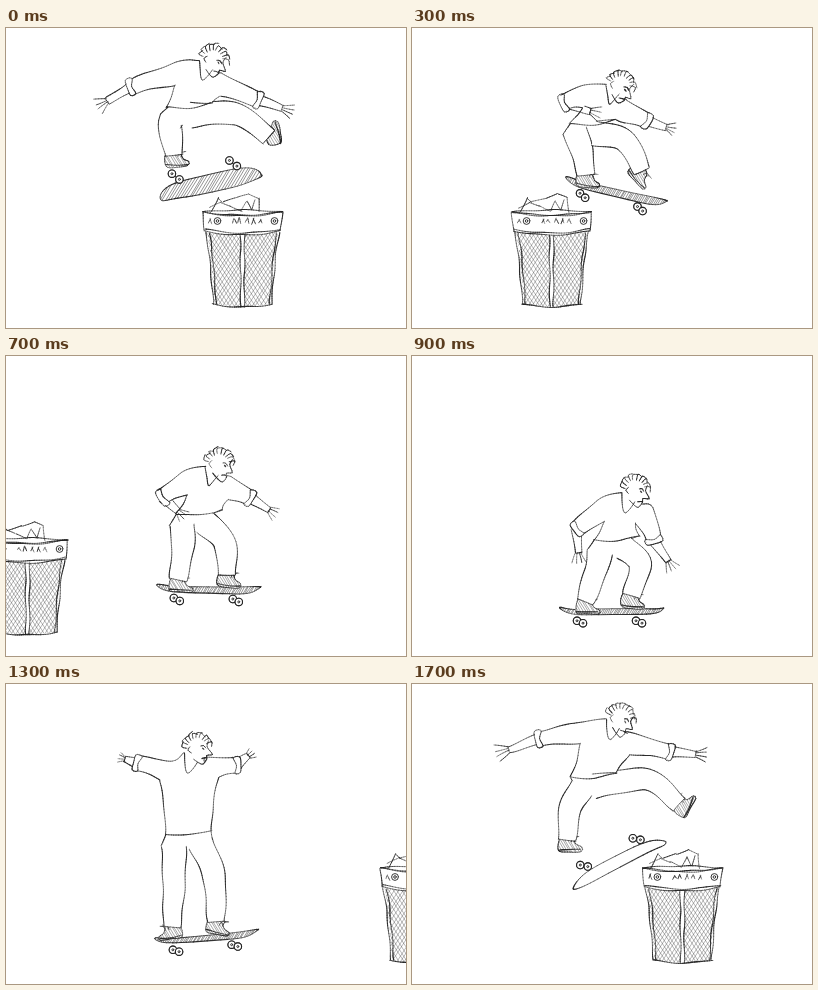
These frames come from a looping animation (400x300 px, 1800 ms). An HTML page with a canvas:

```html
<!DOCTYPE html>
<html lang="en">
<head>
<meta charset="utf-8">
<title>Skateboard jump</title>
<style>
html, body { margin: 0; width: 100%; height: 100%; overflow: hidden; background: #fff; }
canvas { display: block; }
</style>
</head>
<body>
<canvas id="stage" width="400" height="300"></canvas>
<script>
const ctx = document.getElementById('stage').getContext('2d');
const STEP = 100, STEPS = 18;

// Arms: elbow, hand. Legs: hip, knee, ankle. Feet: toe angles, left and right.
// Head: x, y, tilt. Board: x, y, tilt, half width, wheel side, shading.
const poses = [
  { at: 0, head: [207, 32, 20], armL: [125,59, 91,79], armR: [252,72, 287,84],
    legL: [168,90, 164,96, 168,127], legR: [185,87, 230,86, 263,109], feet: [0, -100],
    board: [204, 155, -13, 9, -14, 1] },
  { at: 3, head: [208, 58, 26], armL: [152,75, 189,87], armR: [235,93, 263,102],
    legL: [163,103, 170,124, 174,147], legR: [182,105, 213,113, 230,143], feet: [10, 50],
    board: [204, 165, 13, 4, 10, 1] },
  { at: 5, head: [203, 82, 14], armL: [148,110, 191,115], armR: [246,100, 280,104],
    legL: [164,142, 170,166, 171,202], legR: [187,142, 209,165, 223,198], feet: [5, 5],
    board: [206, 212, 2, 4, 10, 1] },
  { at: 9, ease: 2, head: [223, 134, 10], armL: [165,173, 167,207], armR: [242,184, 262,214],
    legL: [188,196, 184,214, 173,246], legR: [212,192, 228,208, 219,240], feet: [5, 10],
    board: [200, 256, 0, 3, 10, 1] },
  { at: 13, head: [191, 64, 0], armL: [131,79, 113,73], armR: [231,81, 247,68],
    legL: [168,162, 168,198, 166,243], legR: [195,160, 208,192, 210,238], feet: [170, 15],
    board: [201, 254, -5, 3, 10, 1] },
  { at: 15, head: [213, 47, 12], armL: [144,51, 110,39], armR: [262,51, 285,34],
    legL: [182,120, 178,160, 161,216], legR: [192,122, 240,121, 244,164], feet: [140, 150],
    board: [201, 216, -44, 10, 7, 0] },
  { at: 17, head: [208, 35, 20], armL: [127,55, 84,70], armR: [258,68, 295,71],
    legL: [170,104, 159,122, 155,156], legR: [182,102, 236,96, 267,121], feet: [0, -60],
    board: [206, 178, -27, 6, -12, 0] }
];

let seed = 1;
function random() {
  seed = (seed * 16807) % 2147483647;
  return seed / 2147483647;
}
const jitter = size => (random() - 0.5) * size;
const radians = degrees => degrees * Math.PI / 180;
const mix = (a, b, u) => a + (b - a) * u;
const between = (p, q, u) => [mix(p[0], q[0], u), mix(p[1], q[1], u)];
const pairs = flat => flat.flatMap((v, i) => i % 2 ? [] : [[v, flat[i + 1]]]);

function turn([x, y], angle) {
  const c = Math.cos(angle), s = Math.sin(angle);
  return [x * c - y * s, x * s + y * c];
}

function direction(p, q) {
  const length = Math.hypot(q[0] - p[0], q[1] - p[1]) || 1;
  return [(q[0] - p[0]) / length, (q[1] - p[1]) / length];
}

function poseAt(step) {
  const i = poses.findLastIndex(pose => pose.at <= step);
  const from = poses[i], to = poses[(i + 1) % poses.length];
  const u = ((step - from.at) / ((to.at || STEPS) - from.at)) ** (from.ease || 1);
  const pose = {};
  for (const part in to) {
    if (Array.isArray(to[part])) pose[part] = from[part].map((v, k) => mix(v, to[part][k], u));
  }
  return pose;
}

// Dense points of a smooth curve through a few points
function spline(points, closed = false) {
  const n = points.length, dense = [];
  const at = i => points[closed ? (i + n) % n : Math.min(n - 1, Math.max(0, i))];
  for (let i = 0; i < (closed ? n : n - 1); i++) {
    const [a, b, c, d] = [at(i - 1), at(i), at(i + 1), at(i + 2)];
    const parts = Math.max(2, Math.ceil(Math.hypot(c[0] - b[0], c[1] - b[1]) / 2.5));
    for (let k = 0; k < parts; k++) {
      const t = k / parts;
      dense.push([0, 1].map(e => b[e] + t / 2 * (c[e] - a[e]
        + t * (2 * a[e] - 5 * b[e] + 4 * c[e] - d[e] + t * (3 * (b[e] - c[e]) + d[e] - a[e])))));
    }
  }
  dense.push(at(closed ? 0 : n - 1));
  return dense;
}

function trace(points) {
  ctx.beginPath();
  points.forEach(p => ctx.lineTo(p[0], p[1]));
}

function blank(points) {
  ctx.fillStyle = '#fff';
  trace(points);
  ctx.fill();
}

// A line with slow wobble and changing pressure
function stroke(dense, weight = 1) {
  const phase = random() * 6;
  const line = dense.map(([x, y], i) =>
    [x + 0.5 * Math.sin(i * 0.45 + phase), y + 0.5 * Math.cos(i * 0.37 + phase)]);
  for (let i = 1; i < line.length; i++) {
    const pressure = 0.75 + 0.25 * Math.sin(i * 0.3 + phase);
    ctx.globalAlpha = 0.45 + 0.5 * pressure;
    ctx.lineWidth = weight * (0.45 + 0.6 * pressure);
    trace([line[i - 1], line[i]]);
    ctx.stroke();
  }
  ctx.globalAlpha = 1;
}

const pencil = (points, weight, closed) => stroke(spline(points, closed), weight);

function jagged(points, weight) {
  points.slice(1).forEach((p, i) => pencil([points[i], p], weight));
}

function hatch(outline, slope, gap, alpha) {
  const xs = outline.map(p => p[0]), ys = outline.map(p => p[1]);
  const top = Math.min(...ys), bottom = Math.max(...ys), shift = (bottom - top) * slope;
  const left = Math.min(...xs) - Math.abs(shift), right = Math.max(...xs) + Math.abs(shift);
  ctx.save();
  trace(outline);
  ctx.clip();
  ctx.globalAlpha = alpha;
  ctx.lineWidth = 0.65;
  ctx.beginPath();
  for (let x = left; x < right; x += gap) {
    ctx.moveTo(x + jitter(1.5), top);
    ctx.lineTo(x + shift + jitter(1.5), bottom);
  }
  ctx.stroke();
  ctx.restore();
}

function ring(x, y, r, weight = 0.9) {
  ctx.lineWidth = weight;
  ctx.beginPath();
  ctx.arc(x, y, r, 0, Math.PI * 2);
  ctx.stroke();
}

// Both edges of a tapering limb; side is -1 for left, 1 for right, outer edge first
function tube(joints, widths, side) {
  const dense = spline(joints), last = dense.length - 1;
  return [1, -1].map(edge => dense.map((p, i) => {
    const d = direction(dense[Math.max(0, i - 2)], dense[Math.min(last, i + 2)]);
    const u = i / last * (widths.length - 1), k = Math.min(widths.length - 2, Math.floor(u));
    const w = edge * side * mix(widths[k], widths[k + 1], u - k);
    return [p[0] + d[1] * w, p[1] - d[0] * w];
  }));
}

function drawTube(joints, widths, side) {
  const [outer, inner] = tube(joints, widths, side);
  blank([...outer, ...inner.toReversed()]);
  stroke(outer);
  stroke(inner);
  pencil([outer.at(-1), inner.at(-1)]);
  return [outer, inner];
}

function drawShoe(ankle, angle) {
  const a = radians(angle), flip = Math.cos(a) < -0.3 ? -1 : 1;
  const place = points => points.map(([x, y]) => {
    const [dx, dy] = turn([x, y * flip], a);
    return [ankle[0] + dx, ankle[1] + dy];
  });
  const outline = spline(place(pairs([-7,-2, 5,-2, 9,4, 15,7, 14,11, 3,12, -8,11])), true);
  blank(outline);
  hatch(outline, 0.6, 2.4, 0.6);
  stroke(outline);
  pencil(place([[-8, 10], [3, 10], [14, 9]]), 1.3);
  for (const x of [4, 7]) pencil(place([[x, 2], [x + 1, -2], [x + 5, -3]]), 0.8);
}

function drawArm(shoulder, elbow, hand, neck, side) {
  const d = direction(shoulder, elbow), n = [side * d[1], -side * d[0]];
  const off = (p, along, out) =>
    [p[0] + d[0] * along + n[0] * out, p[1] + d[1] * along + n[1] * out];
  const f = direction(elbow, hand), wrist = between(elbow, hand, 0.7);
  const reach = Math.hypot(hand[0] - wrist[0], hand[1] - wrist[1]);
  drawTube([elbow, wrist], [5.5, 3], side);
  for (const spread of [-0.45, -0.15, 0.15, 0.45]) {
    const start = [wrist[0] - f[1] * spread * 6, wrist[1] + f[0] * spread * 6];
    const tip = turn(f, spread);
    pencil([start, [start[0] + tip[0] * reach, start[1] + tip[1] * reach]], 0.8);
  }
  const armpit = off(shoulder, 8, -11);
  const top = [neck, off(shoulder, 0, 10.5), off(elbow, 0, 7.5)];
  const under = [armpit, off(between(shoulder, elbow, 0.65), 0, -8), off(elbow, 0, -7.5)];
  blank([...spline(top), ...spline(under).toReversed()]);
  pencil(top);
  pencil(under);
  const band = [off(elbow, -3, 8), off(elbow, 3, 8), off(elbow, 4, 0), off(elbow, 3, -8), off(elbow, -3, -8)];
  blank(band);
  pencil([...band, off(elbow, -1, 0)], 1, true);
  return armpit;
}

function drawHead([x, y, tilt]) {
  ctx.save();
  ctx.translate(x, y);
  ctx.rotate(radians(tilt + 6));
  ctx.scale(0.92, 0.92);
  pencil(pairs([12,-9, 11,-3, 14,1, 17,5, 11,7, 12,11, 9,17, 4,16, -3,12]), 1.1);
  pencil([[-8, -1], [-10, 3], [-6, 6]], 0.8);
  pencil([[4, -2], [7, -3], [10, -1]], 1.3);
  pencil([[6, 0], [8, 1]], 1.5);
  pencil([[6, 11], [9, 10], [11, 10]], 1.2);
  // shaggy strands around the skull
  for (let a = 175; a <= 330; a += 17) {
    const root = turn([11, 0], radians(a)), tip = turn([17 + jitter(4), 0], radians(a + 22));
    const bend = turn([17, 0], radians(a + 4));
    pencil([root, bend, tip], 0.95);
  }
  ctx.restore();
}

function drawSkater({ head, armL, armR, legL, legR, feet }) {
  const fromHead = (x, y) => {
    const [dx, dy] = turn([x, y], radians(head[2]));
    return [head[0] + dx, head[1] + dy];
  };
  const neckL = fromHead(-13, 5), neckR = [head[0] + 7, head[1] + 14];
  const left = pairs(legL), right = pairs(legR), trouser = [12.5, 11, 8.5];
  const hips = between(left[0], right[0], 0.5);
  const up = direction(hips, between(neckL, neckR, 0.5));
  const waist = [hips[0] + up[0] * 13, hips[1] + up[1] * 13];
  const waistL = [waist[0] - 23, waist[1] + 2], waistR = [waist[0] + 23, waist[1] - 2];

  drawShoe(left[2], feet[0]);
  drawShoe(right[2], feet[1]);
  const outerL = drawTube(left, trouser, -1)[0], outerR = drawTube(right, trouser, 1)[0];
  blank([neckL, waistL, waistR, neckR]);
  pencil([waistL, outerL[0]]);
  pencil([waistR, outerR[0]]);
  pencil([waistL, [waist[0], waist[1] + 3], waistR]);

  const pitL = drawArm(fromHead(-27, 23), ...pairs(armL), neckL, -1);
  const pitR = drawArm(fromHead(12, 20), ...pairs(armR), neckR, 1);
  for (const [pit, hem] of [[pitL, waistL], [pitR, waistR]]) {
    const middle = between(pit, hem, 0.5);
    pencil([pit, [mix(middle[0], waist[0], 0.06), middle[1]], hem]);
  }
  const tip = [neckL[0] + 4, neckL[1] + 20];
  pencil([neckL, [neckL[0] + 1, neckL[1] + 10], tip, [tip[0] + 9, tip[1] - 11]]);
  drawHead(head);
}

function drawBoard([x, y, tilt, half, wheelSide, shade]) {
  const length = 52, outline = [];
  for (let a = 0; a < 360; a += 6) {
    const c = Math.cos(radians(a)), s = Math.sin(radians(a));
    const along = Math.sign(c) * Math.abs(c) ** 0.6;
    const bend = -Math.sign(wheelSide) * 4 * along ** 6;
    const [dx, dy] = turn([along * length, s * half + bend], radians(tilt));
    outline.push([x + dx, y + dy]);
  }
  outline.push(outline[0]);
  blank(outline);
  if (shade > 0.5) hatch(outline, -0.6, 1.4 + half * 0.15, 0.75);
  stroke(outline, 1.1);
  for (const truck of [-32, 27]) {
    const pair = [-1, 1].map(k => {
      const [dx, dy] = turn([truck + k * 3, wheelSide + k * half * 0.4], radians(tilt));
      return [x + dx, y + dy];
    });
    pencil(pair, 1.4);
    for (const [wx, wy] of pair) {
      ctx.fillStyle = '#fff';
      ring(wx, wy, 3.7, 1.1);
      ctx.fill();
      ring(wx, wy, 3.7, 1.1);
      ring(wx, wy, 1);
    }
  }
}

function drawBin(step) {
  const age = (step + 5) % STEPS; // steps since it came into view
  if (age > 13) return;
  const middle = 41, top = 204, depth = 72;
  const rail = k => [0, 0.2, 0.5, 1].map(u => [
    middle + k * (37 - 8 * Math.sqrt(u) ** 1.4), top + 3 * (1 - k * k) + depth * u]);
  const band = (y, half, sag) => [-1, -0.5, 0, 0.5, 1].map(k => [middle + k * half, y + sag * (1 - k * k)]);

  ctx.save();
  ctx.translate(373 - 37.5 * age + 0.4 * age * age, 0);
  jagged(pairs([9,184, 17,170, 21,174, 35,170, 47,166, 57,170, 58,184]), 0.9);
  jagged(pairs([8,180, 19,174, 29,178, 40,183, 45,173, 50,182, 54,172]), 0.8);
  for (const [from, to] of [[-0.96, -0.06], [0.06, 0.96]]) {
    const panel = [...rail(from), ...rail(to).toReversed()];
    hatch(panel, 0.65, 4, 0.5);
    hatch(panel, -0.65, 4, 0.5);
  }
  for (const k of [-1, -0.9, -0.06, 0.06, 0.93, 1]) pencil(rail(k), 1.1);
  pencil(band(top + depth, 30, 3), 1.3);
  for (const sag of [-2, 3, 4]) pencil(band(184, 40, sag), 1);
  for (const y of [201, 203]) pencil(band(y, 38, 4), 1);
  for (const k of [-1, 1]) pencil([[middle + k * 40, 184], [middle + k * 38, 203]]);
  for (const x of [16, 73]) {
    ring(x, 193, 3.4);
    ring(x, 193, 1.3);
  }
  // scribbled marks on the rim
  for (const x of [7, 31, 36, 44, 50, 57]) {
    jagged([0, 1, 2].map(k => [x + k * 1.8, 193 + (k % 2 ? -2 : 2) + jitter(2)]), 0.9);
  }
  ctx.restore();
}

function draw() {
  const step = Math.floor(performance.now() / STEP) % STEPS, pose = poseAt(step);
  seed = 97 + step * 1313;
  ctx.fillStyle = '#fff';
  ctx.fillRect(0, 0, 400, 300);
  ctx.strokeStyle = '#222';
  ctx.lineCap = ctx.lineJoin = 'round';
  drawBin(step);
  drawBoard(pose.board);
  drawSkater(pose);
  requestAnimationFrame(draw);
}
draw();
</script>
</body>
</html>
```
